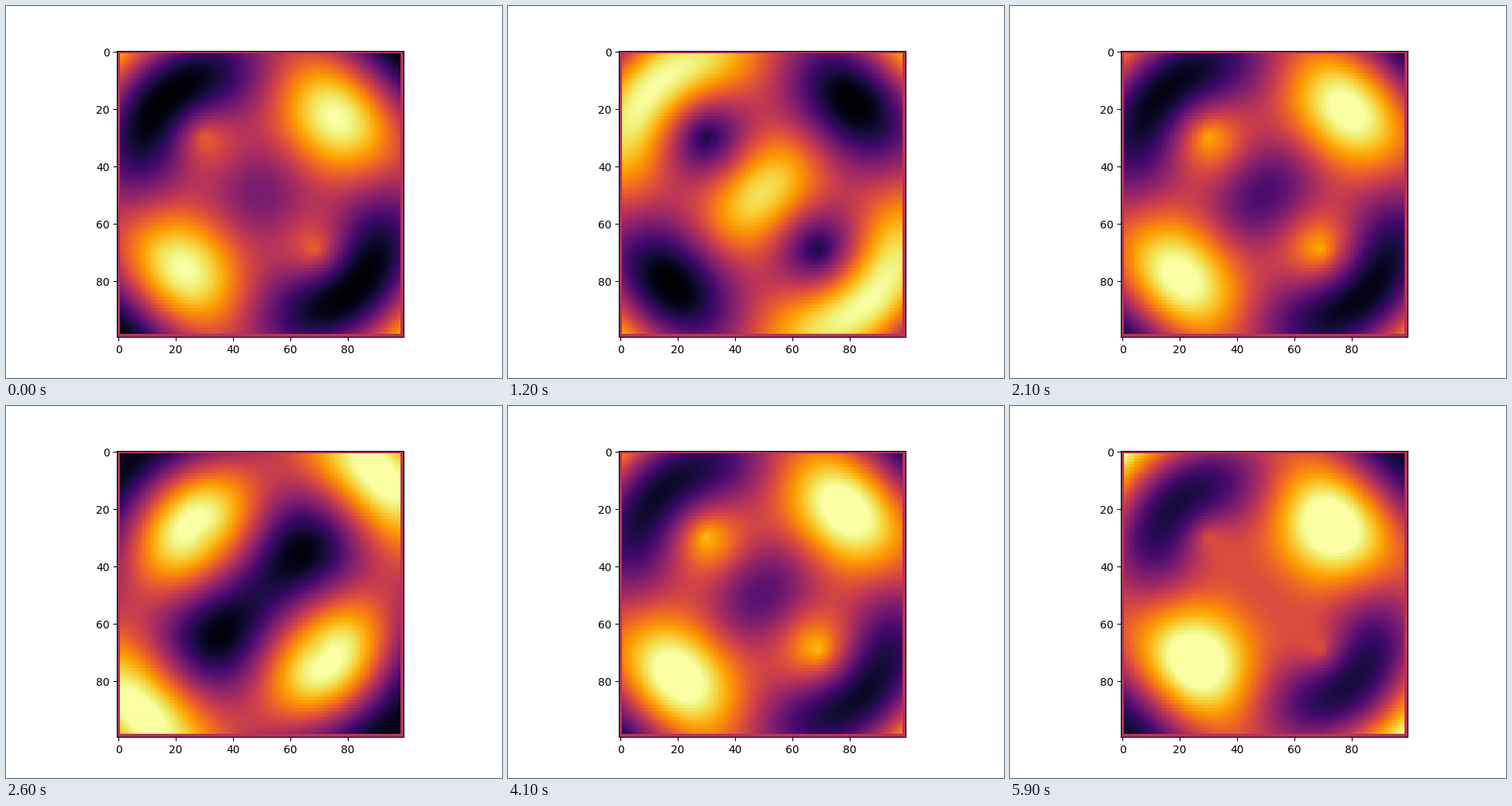
Animation of 640x480 px, one loop 6 s. Source, as a matplotlib script:

```python
import numpy as np
import matplotlib.pyplot as plt
from matplotlib.animation import FuncAnimation

SIZE = 100
FRAMES = 60
WAVENUMBER = 10.0
OMEGA = np.pi / 10      # radians per frame
DRIFT = 0.0066          # slow rise of the mean level per frame
SOURCES = [(0.3, 0.3), (0.7, 0.7)]

axis = np.linspace(0, 1, SIZE)
X, Y = np.meshgrid(axis, axis)
DISTANCES = [np.hypot(X - sx, Y - sy) for sx, sy in SOURCES]


def field(n):
    """Interference of two circular waves inside a border held at zero."""
    waves = sum(np.sin(OMEGA * n - WAVENUMBER * r) for r in DISTANCES)
    u = np.zeros((SIZE, SIZE))
    u[1:-1, 1:-1] = waves[1:-1, 1:-1] + DRIFT * n
    return u


fig, ax = plt.subplots(figsize=(6.4, 4.8), dpi=100)
# The colour range stays fixed to that of the starting state.
image = ax.imshow(field(0), cmap="inferno")


def update(n):
    image.set_data(field(n))
    return [image]


anim = FuncAnimation(fig, update, frames=FRAMES, interval=100,
                     repeat=True, repeat_delay=0, blit=False)
plt.show()
```
